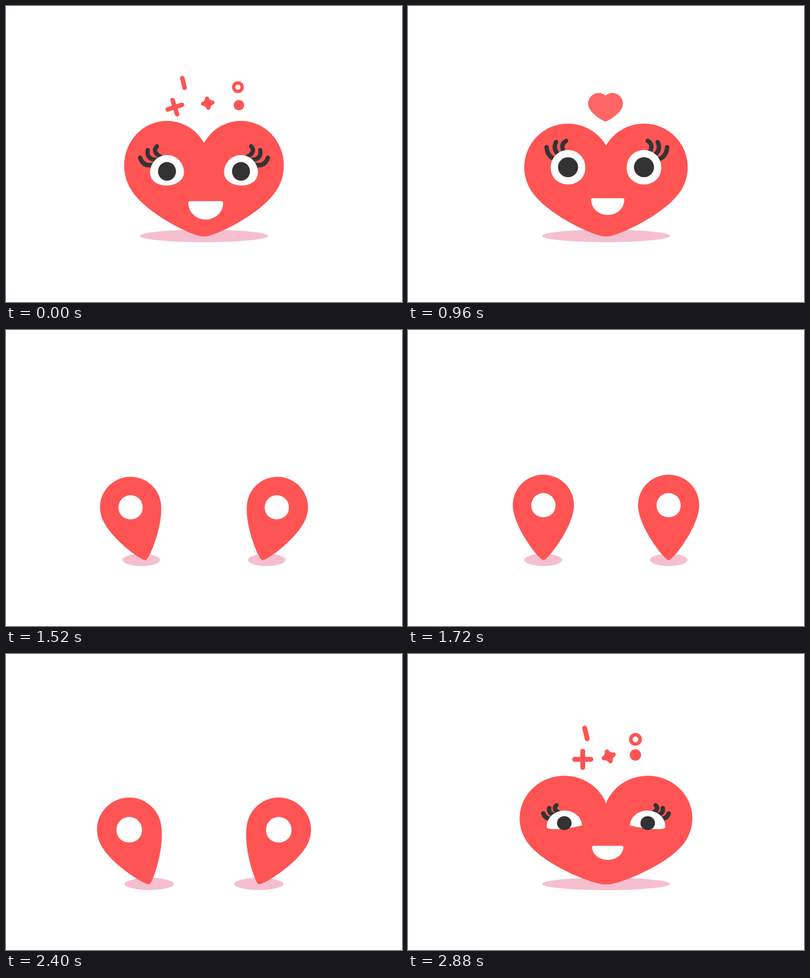
An HTML page with a canvas for the animation above (2920 ms loop, 800 px wide and 600 px high).

```html
<!DOCTYPE html>
<html lang="en">
<head>
<meta charset="utf-8">
<title>Pins in love</title>
<style>
  html, body { margin: 0; height: 100%; overflow: hidden; background: #fff; }
  canvas { display: block; }
</style>
</head>
<body>
<canvas id="stage" width="800" height="600"></canvas>
<script>
const LOOP = 2920, STEP = 40, MID = 400, GROUND = 466.5;
const SPLIT = 1160, SWING = 2240, JOIN = 2640;
const BIG = 159.5, SMALL = 111.5, LEAN = 28.9;
const RED = '#ff5454', DARK = '#333', SHADOW = '#f6bfcf';
const ctx = document.getElementById('stage').getContext('2d');
const pinShape = new Path2D('M-.554-1A.554.554 0 0 1 .554-1C.554-.61 .075 0 0 0C-.075 0-.554-.61-.554-1Z');
const mouthShape = new Path2D('M-1 .1Q-1 0-.9 0L.9 0Q1 0 1 .1C1 .6 .55 1 0 1C-.55 1-1 .6-1 .1Z');

const rad = deg => deg * Math.PI / 180;
const mix = (a, b, k) => a + (b - a) * k;

function ease(t, from, to) {
  const u = Math.min(1, Math.max(0, (t - from) / (to - from)));
  return u * u * (3 - 2 * u);
}

const wave = (t, period) => Math.sin(2 * Math.PI * t / period);
const spring = (t, period, decay) => t < 0 ? 0 : Math.exp(-t / decay) * wave(t, period);

function within(x, y, draw, scaleX = 1, scaleY = scaleX, turn = 0) {
  ctx.save();
  ctx.translate(x, y);
  ctx.scale(scaleX, scaleY);
  ctx.rotate(rad(turn));
  draw();
  ctx.restore();
}

function disc(x, y, rx, ry = rx) {
  ctx.beginPath();
  ctx.ellipse(x, y, rx, ry, 0, 0, 7);
  ctx.fill();
}

function line(x1, y1, x2, y2) {
  ctx.beginPath();
  ctx.moveTo(x1, y1);
  ctx.lineTo(x2, y2);
  ctx.stroke();
}

const pin = (tip, lean, len) => within(-tip, 0, () => {
  ctx.scale(len, len);
  ctx.fill(pinShape);
}, 1, 1, -lean);

const bothSides = draw => { draw(1); draw(-1); };

function floatingHeart(age) {
  if (age < 0 || age > 580) return;
  const size = 79 * ease(age, 0, 240) * (1 - ease(age, 310, 690));
  const y = 254 - .258 * age;
  const shade = 84 + 171 * Math.max(0, (age - 30) / 585) ** 1.8;
  ctx.fillStyle = `rgb(255,${shade},${shade})`;
  bothSides(side => within(399, y + size * .41, () => pin(0, 21, size * .55), side, 1));
}

function sparks(t) {
  const size = 1.1 * ease(t, 2750, 2850) * (1 - ease(t, 2870, 3150));
  if (size < .01) return;
  const u = Math.max(-5, 2.04 * (1 - Math.exp((LOOP - t) / 100)));
  const put = (x, y, dx, dy, turn, draw) => within(x + dx * u, y + dy * u, draw, size, size, turn);
  ctx.strokeStyle = ctx.fillStyle = RED;
  ctx.lineWidth = 9;
  put(358.5, 156, -1, -5, 0, () => line(-2.3, -9.8, 2.3, 9.8));
  put(341, 205, -12, -8.5, -18 - 18 * u, () => {
    line(-15, 0, 15, 0);
    line(0, -15, 0, 15);
  });
  put(407.5, 197, 2, -10.5, -8 + 12 * u, () => {
    ctx.lineWidth = 8;
    ctx.beginPath();
    ctx.moveTo(0, -9.5);
    ctx.quadraticCurveTo(2, -2, 9.5, 0);
    ctx.quadraticCurveTo(2, 2, 0, 9.5);
    ctx.quadraticCurveTo(-2, 2, -9.5, 0);
    ctx.quadraticCurveTo(-2, -2, 0, -9.5);
    ctx.closePath();
    ctx.fill();
    ctx.stroke();
  });
  put(468.5, 164.5, 9, -8.5, 0, () => {
    ctx.lineWidth = 6.6;
    ctx.beginPath();
    ctx.arc(0, 0, 8.6, 0, 7);
    ctx.stroke();
  });
  put(470.5, 201, 11, -3.5, 0, () => disc(0, 0, 10.5));
}

function drawLashes(scale, turn) {
  const polar = (deg, r) => [-r * scale * Math.sin(rad(deg)), -r * scale * Math.cos(rad(deg))];
  ctx.strokeStyle = DARK;
  ctx.lineWidth = 8.8;
  for (let i = 0; i < 3; i++) {
    const angle = 49 - 20.5 * i;
    ctx.beginPath();
    ctx.moveTo(...polar(angle + turn, 62 - 4 * i));
    ctx.quadraticCurveTo(...polar(angle + turn + 16.5, 50), ...polar(angle + turn / 4 + 12, 31));
    ctx.stroke();
  }
}

// A half ellipse on top, a lower lid that flattens as the eye closes.
function drawEye(open, scale) {
  const base = mix(6, 0, open);
  within(0, 0, () => {
    ctx.fillStyle = '#fff';
    ctx.beginPath();
    ctx.ellipse(0, base, 35, mix(32, 35, open), 0, Math.PI, 0);
    ctx.bezierCurveTo(35, base + mix(2, 46.7, open), -35, base + mix(11, 46.7, open), -35, base);
    ctx.fill();
  }, scale, scale, mix(-3.2, 0, open));
}

function render(t) {
  // Story time runs from one split to the next.
  const s = t < SPLIT ? t + LOOP : t;
  const joined = ease(s, 2320, 2680);
  const apart = end => ease(s, SPLIT, end) * (1 - joined);

  const tip = 126.5 * apart(1590);
  const len = mix(BIG, SMALL, apart(1500));
  const lean = LEAN * (1 - apart(1500))
    - 41 * Math.max(0, 1 - (s - SPLIT) / 720) * wave(s - SPLIT, 560)
    + 34 * spring(s - SWING, 450, 330);
  const beat = Math.sin(Math.PI * ease(t, 700, 880));
  const stretch = .14 * spring(s - JOIN, 258, 250) - .02 * beat;
  const sx = 1 - .9 * stretch, sy = 1 + stretch;

  ctx.fillStyle = '#fff';
  ctx.fillRect(0, 0, 800, 600);
  ctx.lineCap = ctx.lineJoin = 'round';

  const spread = apart(1440);
  ctx.fillStyle = SHADOW;
  bothSides(side => disc(MID - side * 126.7 * spread, 466, mix(129, 38, spread), 12.5));

  floatingHeart(t - 770);
  floatingHeart(t - 162);
  sparks(s);

  ctx.fillStyle = RED;
  bothSides(side => within(MID, GROUND, () => pin(tip, lean, len), side * sx, sy));

  // The face squints on joining, opens wide, then settles.
  const arrive = ease(s, JOIN, 2760);
  const open = 1 - ease(s, JOIN, 2720) + ease(s, 2875, 2945);
  const settle = ease(s, LOOP, 3080);
  const glance = ease(t, 600, 800) - ease(t, 1400, 1600);
  const pose = (squint, wide, rest) => mix(mix(squint, wide, open), rest, settle);
  const shown = 1 - ease(s, SPLIT, 1280) + arrive;

  const headX = -tip - len * Math.sin(rad(lean));
  const eyeY = GROUND - sy * len * Math.cos(rad(lean)) + arrive * pose(9.6, 13, 0);
  const face = draw => bothSides(side => within(MID, eyeY, () => {
    ctx.translate(headX - (side < 0 ? 3.5 * (settle - glance) : 0), 0);
    draw(side);
  }, side * sx, sy));

  if (shown > .02) face(side => {
    ctx.translate(side > 0 ? 3.5 * glance : 0, 0);
    drawLashes(shown * (s < JOIN ? 1 : pose(.74, 1.1, 1)), s < JOIN ? 0 : pose(15, 15, 0));
  });
  face(() => drawEye(open, len / BIG));
  if (shown > .01) face(() => {
    ctx.fillStyle = DARK;
    disc(0, 0, shown * mix(14.3, 20.3, open));
  });

  const [mouthW, mouthH, mouthY] = s < JOIN
    ? [33.4 * (1 - ease(s, SPLIT, 1400)), 34 * (1 - ease(s, SPLIT, 1335)), 389.5]
    : [arrive * pose(31.5, 36.7, 33.4), arrive * pose(28.5, 41, 34), pose(388.5, 398.4, 389.5)];
  ctx.fillStyle = '#fff';
  if (mouthH > .05) within(403.5, mouthY, () => ctx.fill(mouthShape), mouthW, mouthH);
}

function tick(now) {
  render(Math.floor(now % LOOP / STEP) * STEP);
  requestAnimationFrame(tick);
}
requestAnimationFrame(tick);
</script>
</body>
</html>
```
